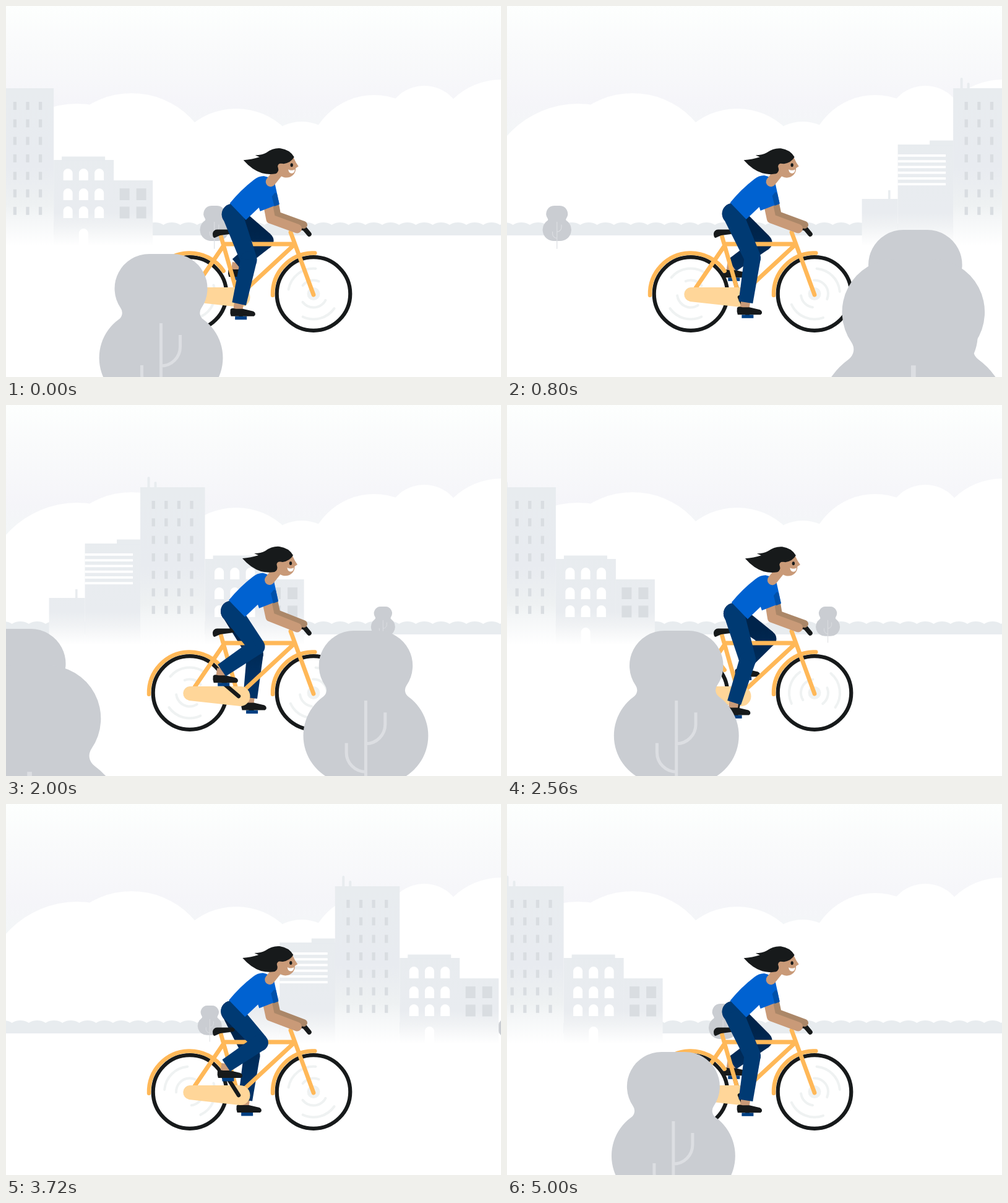
An HTML page with a canvas that plays this animation: 800x600 px, repeating every 5040 ms.

```html
<!DOCTYPE html>
<html>
<head>
<meta charset="utf-8">
<title>Cyclist</title>
<style>
html, body { margin: 0; width: 100%; height: 100%; overflow: hidden; background: #fff; }
canvas { display: block; }
</style>
</head>
<body>
<canvas id="stage" width="800" height="600"></canvas>
<script>
const ctx = document.getElementById('stage').getContext('2d');
const LOOP = 5040, TRAVEL = 2109, RAD = Math.PI / 180, TAU = Math.PI * 2;
const INK = '#171a1b', ORANGE = '#ffb858', SKIN = '#c99a78', GREY = '#e8ecef', PANE = '#d9dde1';

// time, distance travelled, speed
const RIDE = [
  [0, 0, .362], [800, 297, .4], [1320, 511, .42], [2000, 801, .43],
  [3120, 1288, .436], [4280, 1793, .432], [5000, 2094.5, .385], [5040, TRAVEL, .362]
];

function distance(t) {
  const i = RIDE.findIndex(k => k[0] > t);
  const [t0, d0, v0] = RIDE[i - 1], [t1, d1, v1] = RIDE[i];
  const h = t1 - t0, u = (t - t0) / h, w = 1 - u;
  return d0 * (1 + 2 * u) * w * w + d1 * u * u * (3 - 2 * u) + h * u * w * (v0 * w - v1 * u);
}

// x of something that stands at `x` when the distance is `at`
function scroll(x, at, rate, d) {
  const half = TRAVEL / 2;
  const gone = ((d - at + half) % TRAVEL + TRAVEL) % TRAVEL - half;
  return x - rate * gone;
}

function fill(path, color) {
  ctx.fillStyle = color;
  ctx.fill(new Path2D(path));
}

function line(path, color, width, cap = 'round') {
  ctx.strokeStyle = color;
  ctx.lineWidth = width;
  ctx.lineCap = cap;
  ctx.lineJoin = 'round';
  ctx.stroke(new Path2D(path));
}

function disc(x, y, r, color) {
  ctx.fillStyle = color;
  ctx.beginPath();
  ctx.arc(x, y, r, 0, TAU);
  ctx.fill();
}

function arc(x, y, r, from, to, color, width) {
  ctx.strokeStyle = color;
  ctx.lineWidth = width;
  ctx.lineCap = 'round';
  ctx.beginPath();
  ctx.arc(x, y, r, from * RAD, to * RAD);
  ctx.stroke();
}

function rect(x, y, w, h, color) {
  ctx.fillStyle = color;
  ctx.fillRect(x, y, w, h);
}

function moved(x, y, draw, scale = 1) {
  ctx.save();
  ctx.translate(x, y);
  ctx.scale(scale, scale);
  draw();
  ctx.restore();
}

function gradient(y0, y1, stops) {
  const g = ctx.createLinearGradient(0, y0, 0, y1);
  stops.forEach(([at, color]) => g.addColorStop(at, color));
  return g;
}

const SKY = gradient(0, 210, [[0, '#fdfffe'], [.35, '#f9fafb'], [.75, '#f5f5f9'], [1, '#f3f6f7']]);
const TOWER = gradient(133, 388, [[0, GREY], [.5, '#e8ebf0'], [.74, '#eef1f2'], [.82, '#f4f6f7'], [1, '#fff']]);
const HOUSE = gradient(220, 388, [[0, GREY], [.68, '#e9ecf0'], [.8, '#f0f2f4'], [1, '#fff']]);
const FAR_LEG = gradient(365, 450, [[0, '#00244b'], [1, '#003266']]);

function backdrop() {
  rect(0, 0, 800, 600, SKY);
  rect(0, 210, 800, 390, '#fff');
  [[115, 311, 153], [203, 275, 134], [372, 279, 113], [478, 259, 72],
   [595, 252, 108], [676, 192, 63], [800, 230, 111]].forEach(c => disc(...c, '#fff'));
  rect(0, 357, 800, 14, GREY);
  for (let x = -4; x < 820; x += 27.2) {
    ctx.beginPath();
    ctx.ellipse(x, 360, 17, 10, 0, Math.PI, TAU);
    ctx.fill();
  }
}

function arch(x, y, h) {
  fill(`M${x} ${y + h}V${y + 7.5}a7.5 7.5 0 0 1 15 0V${y + h}Z`, '#fff');
}

function city() {
  rect(-147.5, 312, 58, 76, HOUSE);
  rect(-105, 298, 3.5, 14, GREY);
  rect(-89.5, 224, 90, 164, HOUSE);
  rect(-38, 217.5, 38, 8, GREY);
  for (let i = 0; i < 6; i++) rect(-89.5, 240 + i * 9.25, 77.5, 3.8, '#fff');

  line('M13.5 118V134M24.5 126V134', GREY, 4);
  rect(0, 133, 104.5, 255, TOWER);
  for (let row = 0; row < 7; row++)
    for (let col = 0; col < 4; col++) rect(18.5 + col * 20.6, 155 + row * 28.3, 5.3, 13, PANE);

  rect(104.5, 249, 97, 139, HOUSE);
  rect(117.5, 243.5, 70, 6, GREY);
  for (const y of [263, 295, 324])
    for (const x of [120, 145.2, 170.5]) arch(x, y, 19);
  arch(145.2, 360, 28);

  rect(201, 282, 63.5, 106, HOUSE);
  for (const y of [295, 324.5])
    for (const x of [211, 238]) rect(x, y, 16, 19, PANE);
}

function tree() {
  fill('M-19 0A56 56 0 0 0-65.1 87.8A13 13 0 0 1-68.2 105.7A77 77 0 0 0-23 245' +
       'H23A77 77 0 0 0 68.2 105.7A13 13 0 0 1 65.1 87.8A56 56 0 0 0 19 0Z', '#cacdd2');
  line('M0 112V300M31 131V150A31 31 0 0 1 0 181M-31 180V195A31 31 0 0 0 0 226', '#dcdee2', 5, 'butt');
}

function wheelBlur(x, turn) {
  const faint = '#eff2f2';
  disc(x, 465.5, 10.5, faint);
  for (const [r, from, to] of [[41, 187, 272], [41, 32, 112], [22, 25, 140], [22, 215, 290]])
    arc(x, 465.5, r, from + turn, to + turn, faint, 4);
}

function limb(ax, ay, aw, bx, by, bw, color) {
  const len = Math.hypot(bx - ax, by - ay), nx = (ay - by) / len / 2, ny = (bx - ax) / len / 2;
  fill(`M${ax + nx * aw} ${ay + ny * aw}L${bx + nx * bw} ${by + ny * bw}` +
       `L${bx - nx * bw} ${by - ny * bw}L${ax - nx * aw} ${ay - ny * aw}Z`, color);
}

function leg(angle, dx, dy, color) {
  const a = angle * RAD;
  const px = 376 + 32 * Math.cos(a), py = 471 + 32 * Math.sin(a);
  const kx = 405 + 18.5 * Math.cos(a - 310 * RAD), ky = 395.5 + 17.5 * Math.cos(a - 115 * RAD);
  const hx = 365 + dx, hy = 337 + dy;
  line(`M376 471L${px} ${py}`, INK, 6.5);
  rect(px - 9.5, py - 1, 19, 5.5, '#003f82');
  limb(px - 3, py - 24, 15, px - 5, py - 10, 15, SKIN);
  moved(px, py, () => fill('M-17-12Q-16-14-13-14L-8-13H3L20-9Q24-7 23-3L21-1H-16Q-18-6-17-12Z', INK));
  disc(hx, hy, 17, color);
  limb(hx, hy, 33, kx, ky, 27, color);
  disc(kx, ky, 13.3, color);
  limb(kx, ky, 26.5, px - 3, py - 21, 23, color);
}

function bike() {
  for (const x of [297, 497]) arc(x, 465.5, 59.3, 0, 360, INK, 6.2);
  arc(297, 465.5, 66, 178, 326, ORANGE, 6.5);
  arc(497, 465.5, 66, 178, 272, ORANGE, 6.5);
  line('M347 371L373 462M352 385H467L385 461M352 387L305 456M460 366L497 467', ORANGE, 6.8);
  fill('M297 455H379A16 16 0 0 1 378 487L296 478A11.6 11.6 0 0 1 297 455Z', '#ffd699');
  fill('M334 368Q335 362 341 361.5H366Q373 362 368 368L346 371L337 375Q334 375 334 368Z', INK);
  line('M474 359Q482 358 485 363L490 369', INK, 7.5);
}

function arm(x, y, dx, dy, width, color) {
  line(`M${x + dx} ${y + dy}L${x + 4 + dx / 2} ${y + 19 + dy / 2}L${x + 47} ${y + 34.5}`, color, width);
}

function shirt() {
  fill('M361 319Q379 297 400 281Q407 275 416 275Q428 277 434 288L441 320L410 332L408 326L387 346Z', '#0062d1');
  fill('M434 302L429 308L433 324L441 321L437 303Z', '#0051aa');
}

function head(blink) {
  line('M427 283L439 268', SKIN, 16);
  fill('M440 250L463 242L468 252L472 258L467.5 261C468 271 459 278 449 276C438 273 434 262 440 250Z', SKIN);
  fill('M383 248Q397 247 409 243L402 240Q413 240 420 236Q431 228 443 229Q458 231 465 243' +
       'Q460 252 448 254Q440 252 439 260Q441 267 435 270Q424 272 413 269Q397 264 383 248Z', INK);
  disc(443, 258, 4.5, SKIN);
  if (blink) line('M458.5 258Q461 256 463.5 258', INK, 1.6);
  else {
    ctx.fillStyle = INK;
    ctx.beginPath();
    ctx.ellipse(461, 256, 2.2, 3, 0, 0, TAU);
    ctx.fill();
  }
  fill('M455.5 263Q461 266 466 263Q466 269 461 269.5Q456 269 455.5 263Z', '#fff');
}

function draw(t) {
  const d = distance(t), crank = 83 + 360 * 6 * t / LOOP;
  const sway = (mid, size, phase) => mid + size * Math.cos((2 * crank - phase) * RAD);
  const dx = sway(1, 2, 265), bodyY = sway(-2.5, 2.7, 190), headY = sway(-1.2, 2.6, 145);
  const plant = (x, y, at, rate, scale) => moved(scroll(x, at, rate, d), y, tree, scale);

  backdrop();
  plant(609.5, 326, 801, .374, .195);
  plant(337, 323, 0, .8616, .2325);
  moved(scroll(-27, 0, 1, d), 0, city);
  moved(scroll(507.5, 511, 1, d), 0, city);

  const spin = 7 * (crank - 83);
  wheelBlur(297, spin + 150);
  wheelBlur(497, spin);
  leg(crank + 187, dx, bodyY, FAR_LEG);
  bike();
  arm(434, 319.5, dx, bodyY, 12, '#ab8768');
  leg(crank, dx, bodyY, '#003a73');
  arm(423.5, 325.5, dx, bodyY, 15, SKIN);
  moved(dx, bodyY, shirt);
  moved(dx, headY, () => head(t >= 3040 && t < 3200));

  plant(251, 401, 0, 1.268, 1);
  plant(389, 362, 511, 1.268, 1.01);
  plant(582, 365, 801, 1.268, 1.01);
  plant(245, 409, 511, 1.928, 1.537);
  plant(598, 421, 511, 1.928, 1.537);
}

const start = performance.now();
function tick() {
  draw((performance.now() - start) % LOOP);
  requestAnimationFrame(tick);
}
tick();
</script>
</body>
</html>
```
